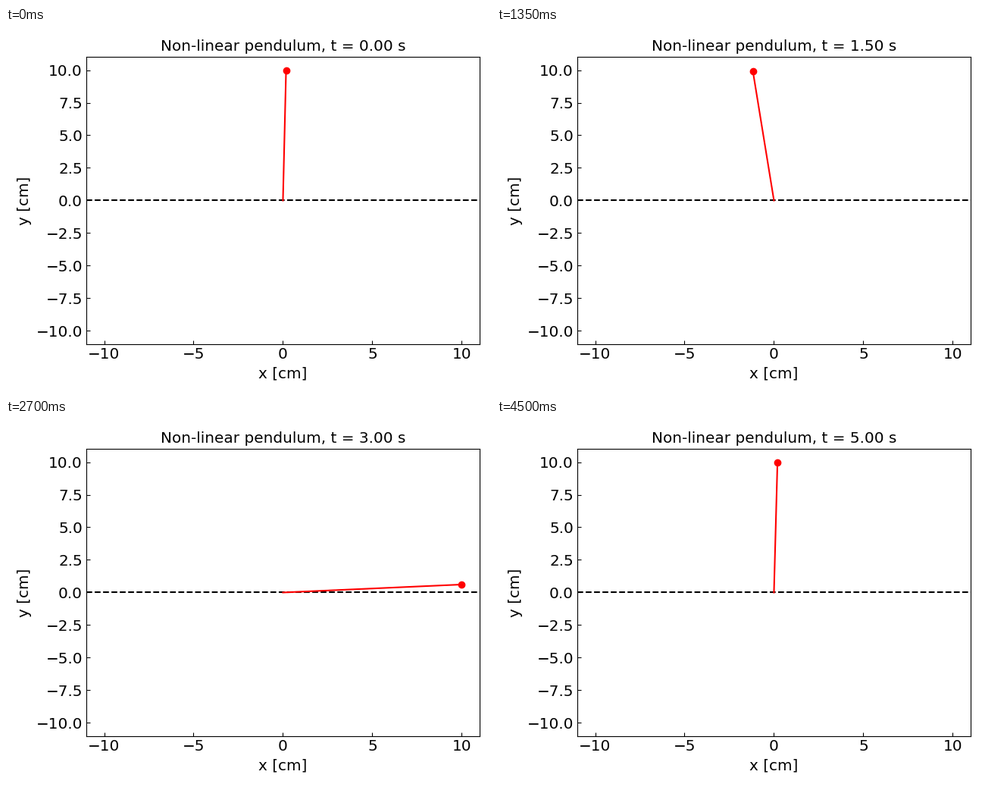
Write a matplotlib script that moves like this. It is 640 px wide and 480 px high and loops after 4530 ms.

```python
import numpy as np
import matplotlib.pyplot as plt
from matplotlib.animation import FuncAnimation

FPS = 30
FRAMES = 151
INTERVAL = 30          # ms per frame
LENGTH = 10.0          # cm
GRAVITY = 981.0        # cm/s^2
START = np.radians(179)
SUBSTEPS = 40
SIZE = "x-large"


def slope(state):
    angle, speed = state
    return np.array([speed, -GRAVITY / LENGTH * np.sin(angle)])


def rk4(state, h):
    a = slope(state)
    b = slope(state + h / 2 * a)
    c = slope(state + h / 2 * b)
    d = slope(state + h * c)
    return state + h / 6 * (a + 2 * b + 2 * c + d)


def swing():
    """Pendulum angle at every frame, released from rest."""
    state = np.array([START, 0.0])
    angles = [START]
    for _ in range(FRAMES - 1):
        for _ in range(SUBSTEPS):
            state = rk4(state, 1 / FPS / SUBSTEPS)
        angles.append(state[0])
    return np.array(angles)


theta = swing()
xs, ys = LENGTH * np.sin(theta), -LENGTH * np.cos(theta)

fig, ax = plt.subplots(figsize=(6.4, 4.8), dpi=100)
ax.set_xlim(-11, 11)
ax.set_ylim(-11, 11)
ax.set_xlabel("x [cm]", fontsize=SIZE)
ax.set_ylabel("y [cm]", fontsize=SIZE)
ax.tick_params(direction="in", labelsize=SIZE)
title = ax.set_title("Non-linear pendulum, t = 0.00 s", fontsize=SIZE)
ax.axhline(0, color="k", ls="--", lw=1.5)
rod, = ax.plot([], [], "r-", lw=1.5)
bob, = ax.plot([], [], "ro", ms=6)
fig.tight_layout()


def draw(i):
    rod.set_data([0, xs[i]], [0, ys[i]])
    bob.set_data([xs[i]], [ys[i]])
    title.set_text(f"Non-linear pendulum, t = {i / FPS:.2f} s")
    return rod, bob, title


anim = FuncAnimation(fig, draw, frames=FRAMES, interval=INTERVAL,
                     init_func=lambda: draw(0), repeat=True, repeat_delay=0)
plt.show()
```
